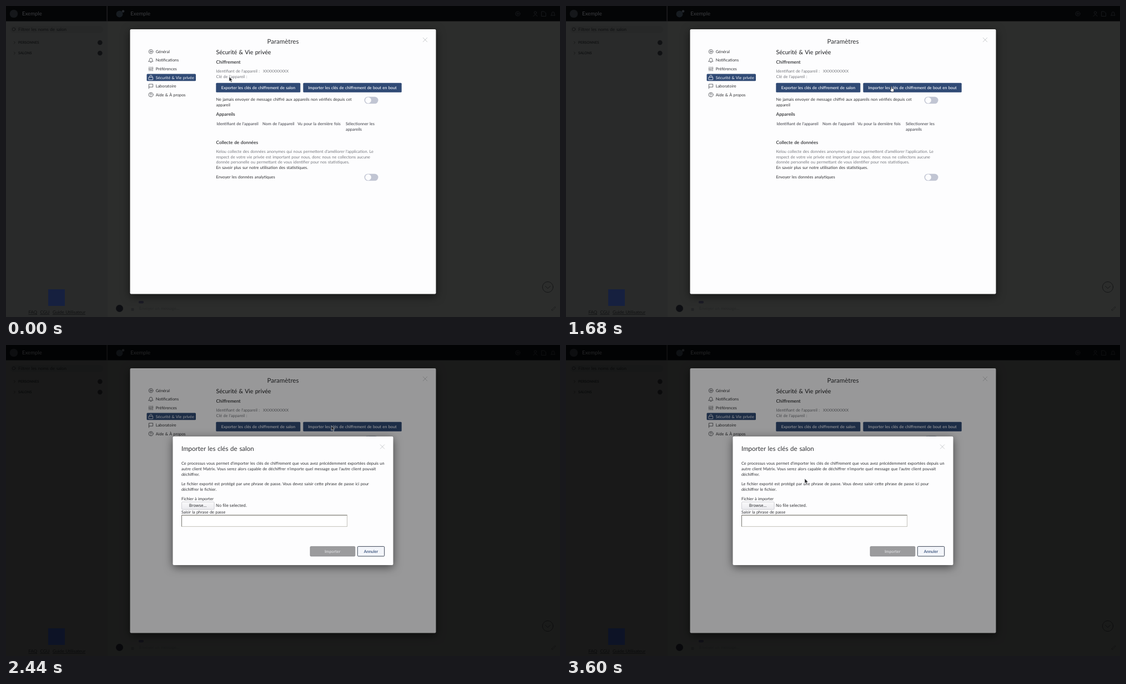
An HTML page that plays this animation: 998x561 px, repeating every 3640 ms.

```html
<!DOCTYPE html>
<html lang="fr">
<head>
<meta charset="utf-8">
<title>Paramètres</title>
<style>
  html, body { margin: 0; width: 100%; height: 100%; overflow: hidden; background: #2c2d2c; }
  svg { display: block; }
  text { font: 7.35px Lato, sans-serif; word-spacing: .07em; text-rendering: geometricPrecision; fill: #2e2f32; white-space: pre; }
  .mid text, text.mid { text-anchor: middle; }
  .title { font-size: 11.5px; }
  .section { font-size: 10.5px; fill: #17181b; }
  .head { font-size: 8.3px; font-weight: 600; }
  .bold { font-size: 7.3px; font-weight: 600; }
  .th text { font-weight: 600; fill: #55565d; }
  .soft text { fill: #74767c; }
  .white { fill: #f4f6fa; }
  .system { font: 7.5px "Noto Sans", sans-serif; word-spacing: 0; }
  .bar text { font-size: 9.6px; fill: #3c3d40; }
  .dim text { fill: #101112; }
  .links text { font-size: 7.9px; text-decoration: underline; }
  .line { fill: none; stroke: #46484d; stroke-width: .8; stroke-linecap: round; stroke-linejoin: round; }
  .dark { stroke: #111214; }
  .close { stroke: #b4b6ba; stroke-width: .7; }
  .blue { fill: #304a75; }
  .dialog { fill: #fdfdfe; filter: drop-shadow(0 4px 8px rgba(0,0,0,.55)); }
</style>
</head>
<body>
<svg width="998" height="561" viewBox="0 0 998 561">
  <defs>
    <g id="toggle"><rect width="25" height="12.6" rx="6.3" fill="#c1c5d3"/><circle cx="7" cy="6.3" r="5.4" fill="#fdfdfe"/></g>
    <path id="cross" class="line close" d="M-3.7-3.7 3.7 3.7M3.7-3.7-3.7 3.7"/>
    <linearGradient id="face" x2="0" y2="1"><stop stop-color="#fafafb"/><stop offset="1" stop-color="#ebebef"/></linearGradient>
  </defs>

  <!-- application behind the dialogs -->
  <rect width="998" height="561" fill="#2c2d2c"/>
  <rect y="27" width="183" height="534" fill="#292a2a"/>
  <g class="bar">
    <rect width="998" height="27.5" fill="#040506"/>
    <rect x="181.6" width="1" height="27.5" fill="#2d2e30"/>
    <circle cx="14" cy="14" r="7.3" fill="#15171a"/>
    <circle cx="204.5" cy="14.5" r="6" fill="#171c21"/>
    <circle cx="211" cy="9.5" r="2.3" fill="#24282c"/>
    <text x="29" y="17.3">Exemple</text>
    <text x="224.3" y="17.3">Exemple</text>
    <g class="line" style="stroke:#1d1f22">
      <circle cx="922" cy="14" r="4"/><circle cx="922" cy="14" r="1.4"/>
      <circle cx="953.5" cy="12" r="2.2"/><path d="M950 18.5q3.5-6 7 0"/>
      <path d="M965 10h4.5l3 3v5.5H965zM982 17h7q-1.3-1.5-1.3-4a2.2 2.2 0 0 0-4.4 0q0 2.5-1.3 4z"/>
    </g>
  </g>
  <g class="dim">
    <rect x="8" y="36" width="167" height="13" rx="6.5" fill="#272828"/>
    <circle class="line dark" cx="14" cy="42" r="2.8"/>
    <text x="22" y="45" style="font-size:8px">Filtrer les noms de salon</text>
    <g style="font-size:6.4px">
      <text x="22" y="68.3" style="font-size:6.4px;font-weight:700">PERSONNES</text>
      <text x="22" y="87.1" style="font-size:6.4px;font-weight:700">SALONS</text>
    </g>
    <path class="line dark" d="M14.5 64l2 2-2 2M14.5 83l2 2-2 2"/>
    <circle cx="169.3" cy="66" r="4.3" fill="#101113"/><circle cx="169.3" cy="85" r="4.3" fill="#101113"/>
    <rect x="76" y="511" width="30" height="30" fill="#16203f"/>
    <g class="links"><text x="40.5" y="555">FAQ</text><text x="61.5" y="555">CGU</text><text x="84" y="555">Guide Utilisateur</text></g>
    <circle cx="204.5" cy="545.5" r="6.5" fill="#0d0e12"/>
    <rect x="239" y="532" width="9" height="4.5" rx="2" fill="#1b1b25"/>
    <rect x="225.5" y="545" width="5" height="5" rx="1" fill="#232425"/>
    <text x="240" y="547.5" style="fill:#242526">Envoyer un message…</text>
    <g class="line dark"><circle cx="976" cy="507" r="9.6"/><path d="M971.5 505.5l4.5 4 4.5-4"/></g>
    <path class="line" style="stroke:#1c1d1e" d="M983 548l5-5q2-1 2 1l-5 5q-2 1-2-1z"/>
  </g>

  <!-- settings -->
  <rect class="dialog" x="223.5" y="42" width="551" height="477.5" rx="2"/>
  <text class="title mid" x="499" y="68">Paramètres</text>
  <use href="#cross" x="755" y="61"/>
  <rect class="blue" x="253.5" y="122.6" width="88.5" height="12.6" rx="1.5"/>
  <g class="line">
    <circle cx="261" cy="82.2" r="3.7"/><circle cx="261" cy="82.2" r="1.3"/>
    <path d="M257 100h8q-1.5-1.2-1.5-3.4a2.5 2.5 0 0 0-5 0q0 2.2-1.5 3.4zM260 101.6h2"/>
    <path d="M258 110v2.2m0 2.2v2.6M261 110v4m0 2v1M264 110v1m0 2.2v3.8M257 113.4h2M260 115h2M263 112.2h2"/>
    <path d="M257.4 149v-8h7.2v5.2h-7.2"/>
    <circle cx="261" cy="160" r="3.9"/><path d="M259.8 159q.1-1.3 1.3-1.2t1 1.3l-1.1 1V161M261 162.2v.1"/>
    <path style="stroke:#f4f6fa" d="M257.4 128.4h7.2v4.6h-7.2zM259 128.4v-1.6a2 2 0 0 1 4 0v1.6"/>
  </g>
  <text x="269.7" y="84.8">Général</text>
  <text x="269.7" y="100.4">Notifications</text>
  <text x="269.7" y="116">Préférences</text>
  <text class="white" x="269.7" y="131.6">Sécurité &amp; Vie privée</text>
  <text x="269.7" y="147.2">Laboratoire</text>
  <text x="269.7" y="162.8">Aide &amp; À propos</text>

  <text class="section" x="378.5" y="86.5">Sécurité &amp; Vie privée</text>
  <text class="head" x="378.5" y="104.4">Chiffrement</text>
  <g class="soft">
    <text x="378.5" y="120.2">Identifiant de l'appareil :</text><text x="463" y="120.2" style="font-size:7.1px">XXXXXXXXXX</text>
    <text x="378.5" y="130.2">Clé de l'appareil :</text>
  </g>
  <rect class="blue" x="378.3" y="138.8" width="152" height="17" rx="1.5"/>
  <rect class="blue" x="535.3" y="138.8" width="177.4" height="17" rx="1.5"/>
  <g class="mid">
    <text class="bold white" x="454.4" y="149.8">Exporter les clés de chiffrement de salon</text>
    <text class="bold white" x="624" y="149.8">Importer les clés de chiffrement de bout en bout</text>
  </g>
  <text x="378.5" y="171.2">Ne jamais envoyer de message chiffré aux appareils non vérifiés depuis cet</text>
  <text x="378.5" y="181.2">appareil</text>
  <use href="#toggle" x="645.5" y="163.7"/>
  <text class="head" x="378.5" y="198">Appareils</text>
  <g class="th">
    <text x="379.5" y="214.8">Identifiant de l'appareil</text>
    <text x="462" y="214.8">Nom de l'appareil</text>
    <text x="525.2" y="214.8">Vu pour la dernière fois</text>
    <text x="612" y="214.8">Sélectionner les</text>
    <text x="612" y="224.8">appareils</text>
  </g>
  <text class="head" x="378.5" y="248.8">Collecte de données</text>
  <g class="soft">
    <text x="378.5" y="264.6">Kelou collecte des données anonymes qui nous permettent d'améliorer l'application. Le</text>
    <text x="378.5" y="274.5">respect de votre vie privée est important pour nous, donc nous ne collectons aucune</text>
    <text x="378.5" y="284.4">donnée personelle ou permettant de vous identifier pour nos statistiques.</text>
  </g>
  <text x="378.5" y="294.3">En savoir plus sur notre utilisation des statistiques.</text>
  <text x="378.5" y="311.4">Envoyer les données analytiques</text>
  <use href="#toggle" x="645.5" y="302.7"/>

  <!-- key import -->
  <g id="importer">
    <rect width="998" height="561" opacity=".4"/>
    <rect class="dialog" x="300.5" y="165" width="397" height="232" rx="2"/>
    <text class="title" x="316" y="191">Importer les clés de salon</text>
    <use href="#cross" x="678" y="183.5"/>
    <text x="316" y="216">Ce processus vous permet d'importer les clés de chiffrement que vous avez précédemment exportées depuis un</text>
    <text x="316" y="226">autre client Matrix. Vous serez alors capable de déchiffrer n'importe quel message que l'autre client pouvait</text>
    <text x="316" y="236">déchiffrer.</text>
    <text x="316" y="253">Le fichier exporté est protégé par une phrase de passe. Vous devez saisir cette phrase de passe ici pour</text>
    <text x="316" y="263">déchiffrer le fichier.</text>
    <text x="316" y="280">Fichier à importer</text>
    <rect x="316.5" y="283" width="58.6" height="13.6" rx="1.5" fill="url(#face)" stroke="#c6c6cc" stroke-width=".8"/>
    <text class="system mid" x="345.6" y="292.4">Browse…</text>
    <text class="system" x="378" y="292.4">No file selected.</text>
    <text x="316" y="304">Saisir la phrase de passe</text>
    <rect x="316.5" y="307" width="298" height="20.4" fill="#fff" stroke="#c4c2bb"/>
    <path d="M316.5 327.4V307h298" fill="none" stroke="#77766f"/>
    <rect x="548" y="363.4" width="80.8" height="17.6" rx="1.5" fill="#9b9b9d" stroke="#858588" stroke-width=".8"/>
    <rect x="633.3" y="363.4" width="48.4" height="17.6" rx="1.5" fill="#f3f5fa" stroke="#3d4657"/>
    <g class="mid">
      <text class="bold" x="588.2" y="374.6" style="fill:#dedee0">Importer</text>
      <text class="bold" x="657.5" y="374.6" style="fill:#304a75">Annuler</text>
    </g>
  </g>

  <g id="cursor" stroke-linejoin="round">
    <path id="arrow" d="M0 0v8.6l2-1.8 1.5 3.2 1.4-.7-1.4-3.1h2.6z" fill="#222326" stroke="#e8e9ec" stroke-width=".6"/>
    <path id="hand" d="M-.5 0q.8-.9 1.4 0v3l3 .8q1 .3.8 1.6l-.6 3.8H0L-2.2 5.6q.2-1 1.2-.5l.5.6z" fill="#fff" stroke="#222326" stroke-width=".6"/>
  </g>
</svg>
<script>
  const LOOP = 3640, OPEN = 2440, RELEASE = 2400;
  const el = id => document.getElementById(id);
  const show = (id, on) => el(id).style.display = on ? '' : 'none';
  const ease = (t, from, to) => {
    const u = Math.min(1, Math.max(0, (t - from) / (to - from)));
    return (1 - Math.cos(Math.PI * u)) / 2;
  };

  function draw(t) {
    const reach = ease(t, 0, 850), leave = ease(t, 2960, 3600);
    const x = 402 + 184 * reach - 156 * leave;
    const y = 127.5 + 18 * reach + 95.5 * leave;
    const overButton = y > 138.8 && y < 155.8 && (x < 530.3 || x > 535.3);
    const hand = overButton && t < RELEASE;
    el('cursor').setAttribute('transform', `translate(${x} ${y})`);
    show('hand', hand);
    show('arrow', !hand);
    show('importer', t >= OPEN);
  }

  const start = performance.now();
  function tick() {
    draw((performance.now() - start) % LOOP);
    requestAnimationFrame(tick);
  }
  tick();
</script>
</body>
</html>
```
